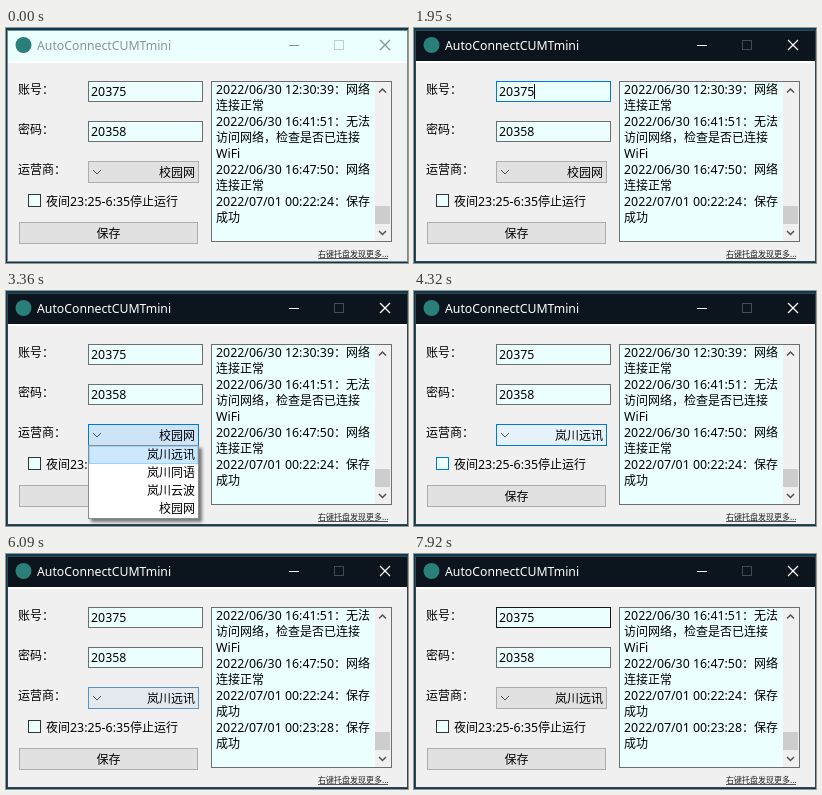
Write an HTML page with a canvas that moves like this. It is 402 by 235 pixels and loops after 8 s.

```html
<!DOCTYPE html>
<html lang="zh-CN">
<head>
<meta charset="utf-8">
<style>
  html, body { margin: 0; width: 100%; height: 100%; overflow: hidden; background: #0c3a50; }
  canvas { display: block; }
</style>
</head>
<body>
<canvas id="stage" width="402" height="235"></canvas>
<script>
const c = document.getElementById('stage').getContext('2d');
const LOOP = 8000;
const PALE = '#ebffff', FACE = '#f0f0f0', BLUE = '#0078d7', INK = '#000000', EDGE = '#6e6e6e';
const NORMAL = ['#adadad', '#e1e1e1'], HOT = [BLUE, '#e5f1fb'], PRESSED = ['#005499', '#cce4f7'];
const carriers = ['岚川远讯', '岚川同语', '岚川云波', '校园网'];
const log = [
  '2022/06/30 12:30:39：网络', '连接正常',
  '2022/06/30 16:41:51：无法', '访问网络，检查是否已连接', 'WiFi',
  '2022/06/30 16:47:50：网络', '连接正常',
  '2022/07/01 00:22:24：保存', '成功',
  '2022/07/01 00:23:28：保存', '成功'
];

const ramp = (t, a, b) => Math.min(1, Math.max(0, (t - a) / (b - a)));
const fade = (t, on, off, d = 180, out = d) =>
  ramp(t, on, on + d) * (1 - ramp(t, off, off + out));

// Blend two #rrggbb colours.
function mix(a, b, k) {
  const part = (s, i) => parseInt(s.slice(i, i + 2), 16);
  return '#' + [1, 3, 5].map(i =>
    Math.round(part(a, i) + (part(b, i) - part(a, i)) * k).toString(16).padStart(2, '0')).join('');
}
const blend = (from, to, k) => from.map((color, i) => mix(color, to[i], k));

function rect(x, y, w, h, fill) {
  c.fillStyle = fill;
  c.fillRect(x, y, w, h);
}

function box(x, y, w, h, edge, fill) {
  rect(x, y, w, h, edge);
  rect(x + 1, y + 1, w - 2, h - 2, fill);
}

function line(color, width, ...pts) {
  c.strokeStyle = color;
  c.lineWidth = width;
  c.beginPath();
  for (let i = 0; i < pts.length; i += 2) c.lineTo(pts[i], pts[i + 1]);
  c.stroke();
}

// Latin runs are set slightly larger than Chinese ones.
function text(str, x, y, { color = INK, size = 12, align = 0 } = {}) {
  const runs = str.match(/[\x00-\x7f]+|[^\x00-\x7f]+/g).map(s => {
    const px = s.charCodeAt(0) < 128 ? size * 1.03 : size;
    const font = px + 'px "Noto Sans", "Noto Sans CJK SC", "Noto Sans CJK", "Noto Sans CJK JP", sans-serif';
    c.font = font;
    return { s, font, w: c.measureText(s).width };
  });
  x -= align * runs.reduce((sum, r) => sum + r.w, 0);
  c.fillStyle = color;
  for (const r of runs) {
    c.font = r.font;
    c.fillText(r.s, x, y);
    x += r.w;
  }
}

function frame(t) {
  const k = ramp(t, 990, 1290);
  const fg = mix('#8c9496', '#ffffff', k);
  box(1, 2, 401, 232, mix('#7d8c92', '#34474f', k), FACE);
  rect(2, 3, 399, 30, mix(PALE, '#0c151d', k));
  rect(2, 33, 399, 2, '#ffffff');

  c.fillStyle = '#2a7f7b';
  c.beginPath();
  c.arc(17.5, 17, 8, 0, 7);
  c.fill();
  text('AutoConnectCUMTmini', 31, 22, { color: fg, size: 11.9 });

  line(fg, 1, 283, 17.5, 293, 17.5);
  line(fg, 1.2, 374, 12, 384, 22);
  line(fg, 1.2, 384, 12, 374, 22);
  c.strokeStyle = mix('#c4cdce', '#434b52', k);
  c.lineWidth = 1;
  c.strokeRect(328.5, 12.5, 9, 9);
}

function field(y, value, edge) {
  box(82, y, 115, 21, edge, PALE);
  text(value, 85, y + 15);
}

function history(t) {
  box(205, 53, 181, 161, EDGE, PALE);
  const first = t < 5130 ? 0 : 2;
  log.slice(first, first + 9).forEach((s, i) => text(s, 210, 66 + i * 16));
  rect(369, 54, 16, 159, FACE);
  rect(369, 178, 15, 18, '#cdcdcd');
  line('#505050', 1.5, 373, 64.5, 376.5, 61, 380, 64.5);
  line('#505050', 1.5, 373, 203, 376.5, 206.5, 380, 203);
}

function combo(t) {
  const hover = fade(t, 420, 720, 180, 30) + fade(t, 1980, 4380, 180, 240) + fade(t, 6000, 6510, 180, 390);
  const press = fade(t, 2190, 3780, 630, 270);
  const look = blend(blend(NORMAL, HOT, hover), [BLUE, PRESSED[1]], press);
  box(82, 133, 111, 22, ...look);
  line('#505050', 1, 87, 142, 91, 146, 95, 142);
  text(carriers[t < 3780 ? 3 : 0], 189, 149, { align: 1 });
}

function checkbox(t) {
  const hover = fade(t, 240, 390, 90) + fade(t, 3810, 4350, 180) + fade(t, 5820, 5970, 120);
  box(22, 166, 13, 13, mix('#333333', BLUE, hover), PALE);
  text('夜间23:25-6:35停止运行', 40, 178);
}

function button(t) {
  const hover = fade(t, 4500, 5670, 210);
  const press = fade(t, 4980, 5130, 60, 150);
  box(13, 194, 179, 22, ...blend(blend(NORMAL, HOT, hover), PRESSED, press));
  text('保存', 102.5, 210, { align: 0.5 });
}

function dropdown(t) {
  const h = 74 * ramp(t, 2190, 2370);
  const pick = t < 2400 ? 3 : t < 2970 ? 1 : t < 3300 ? 2 : t < 3360 ? 1 : 0;
  c.save();
  c.shadowColor = 'rgba(0,0,0,.5)';
  c.shadowBlur = 3;
  c.shadowOffsetX = c.shadowOffsetY = 3;
  rect(82, 154, 111, h, '#ffffff');
  c.restore();

  c.save();
  c.beginPath();
  c.rect(82, 154, 111, h);
  c.clip();
  c.translate(0, h - 74);
  box(82, 154, 111, 74, '#8c8c8c', '#ffffff');
  carriers.forEach((name, i) => {
    const y = 155 + i * 18;
    if (i === pick) box(83, y, 109, 18, '#99d1ff', '#cce8ff');
    text(name, 189, y + 13, { align: 1 });
  });
  c.restore();
}

function draw(t) {
  rect(0, 0, 402, 235, '#0c3a50');
  frame(t);

  text('账号：', 12, 66);
  text('密码：', 12, 106);
  text('运营商：', 12, 146);

  const edge = mix(EDGE, BLUE, fade(t, 990, 2190));
  field(53, '20375', mix(edge, '#171717', ramp(t, 7710, 7920)));
  field(93, '20358', EDGE);
  if ((t >= 1050 && t < 1590) || (t >= 1770 && t < 2190)) rect(120, 56, 1, 15, INK);

  combo(t);
  checkbox(t);
  button(t);
  history(t);

  text('右键托盘发现更多...', 312, 229, { size: 8, color: '#222222' });
  rect(312, 230, 70, 1, '#555555');

  if (t >= 2190 && t < 3780) dropdown(t);
}

function tick() {
  draw(performance.now() % LOOP);
  requestAnimationFrame(tick);
}
tick();
</script>
</body>
</html>
```
